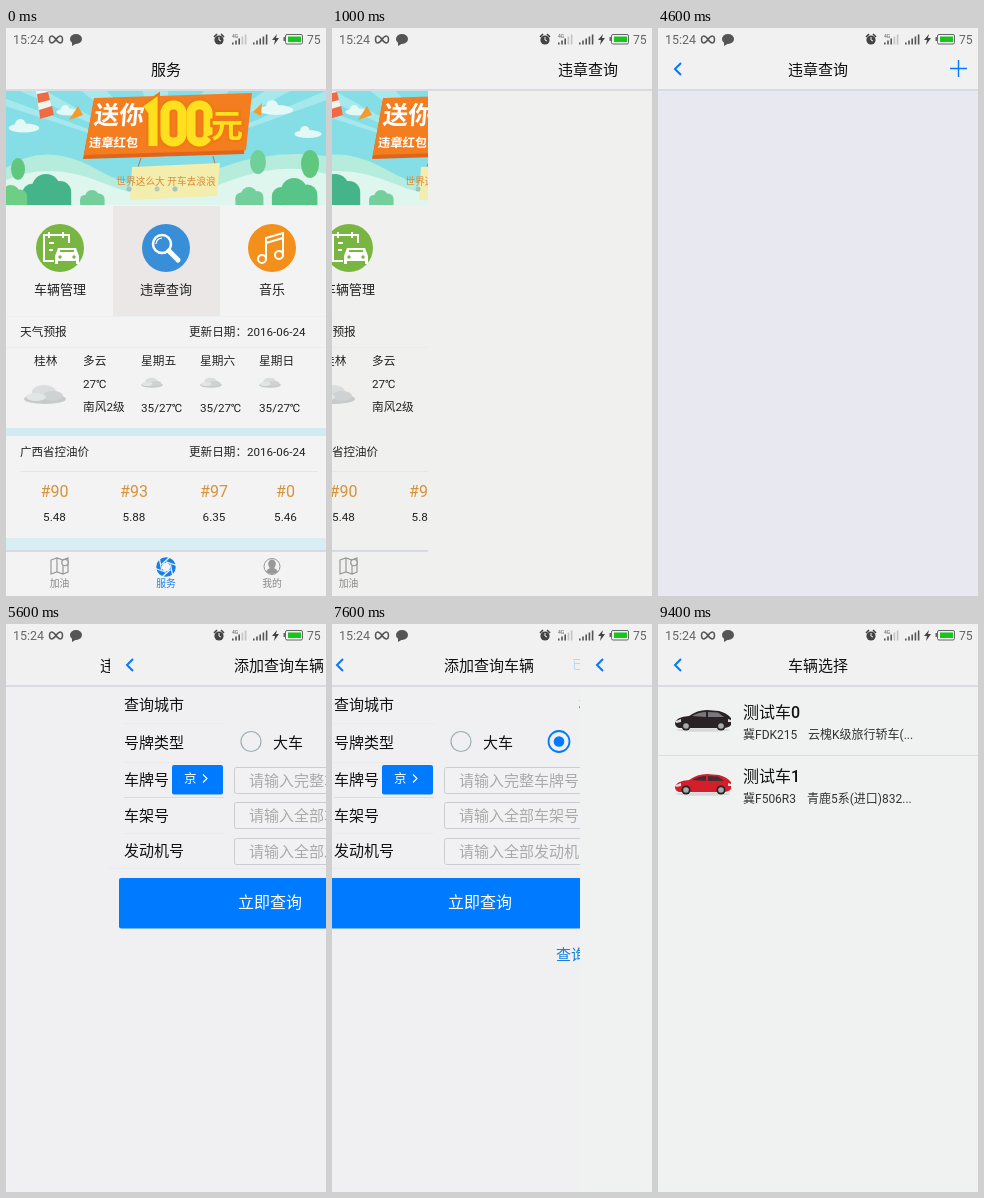
An HTML page that plays this animation: 320 by 568 pixels, repeating every 10 s.

```html
<!DOCTYPE html>
<html lang="zh-CN">
<head>
<meta charset="utf-8">
<style>
html, body { margin: 0; width: 100%; height: 100%; overflow: hidden; background: #f2f2f2; }
svg { display: block; width: 320px; height: 568px; }
text { font-family: Roboto, "Noto Sans CJK SC", "Noto Sans CJK", sans-serif; white-space: pre; }
</style>
</head>
<body>
<svg id="stage" viewBox="0 0 320 568"></svg>
<script>
const BLUE = '#007aff';
const stage = document.getElementById('stage');

// Markup helpers; text is placed by its vertical centre
const text = (x, y, s, size = 11.7, fill = '#222', extra = '') =>
  `<text x="${x}" y="${y + size * .37}" font-size="${size}" fill="${fill}" ${extra}>${s}</text>`;
const mid = (x, y, s, size, fill, extra = '') => text(x, y, s, size, fill, 'text-anchor="middle" ' + extra);
const rect = (x, y, w, h, fill, extra = '') =>
  `<rect x="${x}" y="${y}" width="${w}" height="${h}" fill="${fill}" ${extra}/>`;
const circle = (x, y, r, fill, extra = '') => `<circle cx="${x}" cy="${y}" r="${r}" fill="${fill}" ${extra}/>`;
const oval = (x, y, rx, ry, fill) => `<ellipse cx="${x}" cy="${y}" rx="${rx}" ry="${ry}" fill="${fill}"/>`;
const shape = (d, fill) => `<path d="${d}" fill="${fill}"/>`;
const line = (d, stroke, w = 1, extra = '') =>
  `<path d="${d}" fill="none" stroke="${stroke}" stroke-width="${w}" ${extra}/>`;
const group = (x, y, s, extra = '') => `<g transform="translate(${x} ${y})" ${extra}>${s}</g>`;

const header = (title, x) => rect(0, 22, 320, 39, '#f1f1f1') + rect(0, 61, 320, 2, '#d8dbe1') +
  mid(x, 41, title, 15, '#111');
const back = line('M23 35l-6 6l6 6', BLUE, 2);
const page = (id, bg, title, body, titleX = 160) =>
  `<g id="${id}">${rect(0, 0, 320, 568, bg, 'class="bg"')}${body}${header(title, titleX)}`;

function statusBar() {
  const bars = x => [0, 1, 2, 3, 4].map(i =>
    rect(x + i * 3.2, 14.5 - i * 2, 1.6, 2 + i * 2, i > 2 && x < 240 ? '#c4c4c4' : '#555')).join('');
  return rect(0, 0, 320, 22, '#f1f1f1') + text(7, 11.5, '15:24', 12.5, '#666') +
    line('M50 11.500C46 6 43.500 8 43.500 11.500S46 17 50 11.500S56.500 8 56.500 11.500S54 17 50 11.500', '#555', 1.5) +
    oval(70, 11, 6, 5, '#555') + shape('M66 13v5l5-3z', '#555') +
    circle(213, 12, 4.6, '#444') + line('M213 9v3l2 1', '#f2f2f2') + line('M208 9l3-3M218 9l-3-3', '#444', 1.6) +
    text(226, 8, '4G', 5, '#555') + bars(226) + bars(247) +
    shape('M271 6l-5 6h3l-1 5l5-7h-3z', '#444') +
    rect(279.500, 6.500, 17, 9.500, 'none', 'rx="1.500" stroke="#666"') + rect(277.500, 9, 2, 4, '#666') +
    rect(282, 8.500, 13, 5.500, '#18c51c') + text(301, 11.5, '75', 12.2, '#666');
}

function banner() {
  const rays = [0, 1, 2, 3, 4, 5, 6].map(i =>
    shape(`M160 130L${-50 + i * 62} 62h26z`, '#a5e9ec')).join('');
  const cloud = (x, y, k) => oval(x, y, 17 * k, 5 * k, '#e4f8f6') + circle(x - 4 * k, y - 4 * k, 6 * k, '#e4f8f6');
  const bush = (x, y, r, fill) => circle(x, y, r, fill) + circle(x + r, y + r * .3, r * .8, fill) +
    circle(x - r, y + r * .4, r * .7, fill) + rect(x - r * 1.7, y + r * .4, r * 3.5, 177 - y - r * .4, fill);
  const zero = x => `<rect x="${x}" y="77" width="17" height="37" rx="8"/>`;
  const hundred = (stroke, w) =>
    `<g fill="none" stroke="${stroke}" stroke-width="${w}"><path d="M140 82l7-5v41"/>${zero(159)}${zero(185)}</g>`;
  const yuan = mid(221, 97, '元', 32, '#ffe01f',
    'font-weight="900" stroke="#f07a14" stroke-width="5" paint-order="stroke"');
  return rect(0, 62, 320, 115, '#85dde6') + rays + cloud(18, 100, .9) + cloud(62, 84, .7) +
    cloud(270, 82, 1) + cloud(302, 106, .8) +
    shape('M30 62h11l7 25l-14 4z', '#f4f4ee') + shape('M31 66l11-2l2 8l-12 3zM33 82l13-4l2 9l-14 4z', '#ee6b46') +
    shape('M0 140Q40 112 92 142T200 146T320 128V177H0z', '#b5ecdc') +
    shape('M0 152Q45 132 100 156T215 156T320 146V177H0z', '#dff6ee') +
    oval(12, 141, 7, 11, '#5fc77e') + oval(222, 88, 7, 9, '#5fc77e') +
    oval(252, 134, 8, 12, '#6fd09a') + oval(304, 136, 9, 14, '#5fc77e') +
    bush(40, 160, 14, '#45b48b') + bush(5, 166, 9, '#6fce85') + bush(86, 169, 7, '#74cf9c') +
    bush(243, 167, 8, '#74cf9c') + bush(288, 163, 13, '#58c487') +
    shape('M63 92l9-14l5 9z', '#f59b2c') + shape('M247 84l9-9l-1 13z', '#f59b2c') +
    shape('M88 72L244 67L238 126L77 131z', '#e0651a') + shape('M88 70L246 65L240 122L78 127z', '#f47d20') +
    '<g transform="skewX(-5) translate(9 0)">' + text(87, 87, '送你', 25, '#fff', 'font-weight="900"') +
    text(84, 114, '违章红包', 12.3, '#fff', 'font-weight="700"') + '</g>' +
    hundred('#f07a14', 14) + hundred('#ffe01f', 9) + yuan +
    line('M135 130l-4 12M207 128l3 12', '#b27b3f') +
    shape('M126 139L214 135L211 168L124 172z', '#f3edae') +
    mid(160, 153, '世界这么大 开车去浪浪', 9.7, '#d98a35', 'font-weight="500"') +
    circle(123, 161, 2.5, '#9fc5c1') + circle(151, 161, 2.5, '#b9c9b5') + circle(169, 161, 2.5, '#9fc5c1');
}

function cloudIcon(x, y, k) {
  return group(x, y, `<g transform="scale(${k})">` + oval(0, 4, 21, 5, '#c6caca') + oval(-1, -3, 12, 7, '#d9dddd') +
    oval(8, 1, 10, 5, '#ced2d2') + oval(-9, 2, 10, 4, '#e2e5e5') + '</g>');
}

function home() {
  const menu = [['#78b641', '车辆管理'], ['#398ed8', '违章查询'], ['#f3901c', '音乐']].map(([c, s], i) =>
    circle(54 + i * 106, 220, 24, c) + mid(54 + i * 106, 261, s, 13)).join('');
  const icons = line('M48 233H38V207h25v8M43 204v6M57 204v6M43 215h5M43 222h4', '#fff', 2) +
    shape('M49 228l3-8h18l3 8v8h-3v-3h-18v3h-3z', '#fff') +
    circle(54, 229, 1.7, '#78b641') + circle(68, 229, 1.7, '#78b641') + line('M54 223h14', '#78b641', 2) +
    circle(156, 216, 9, 'none', 'stroke="#fff" stroke-width="2.500"') +
    line('M163 223l9 9', '#fff', 5, 'stroke-linecap="round"') + line('M150 216a6 6 0 0 1 6-6', '#fff', 1.2) +
    line('M260 231V210l17-5v21M260 215l17-5', '#fff', 2) +
    circle(256, 231, 4, 'none', 'stroke="#fff" stroke-width="2"') +
    circle(273, 227, 4, 'none', 'stroke="#fff" stroke-width="2"');
  const days = ['五', '六', '日'].map((d, i) => {
    const x = 135 + i * 59;
    return text(x, 333, '星期' + d) + cloudIcon(x + 11, 355, .52) + text(x, 380, '35/27℃');
  }).join('');
  const prices = [['#90', '5.48'], ['#93', '5.88'], ['#97', '6.35'], ['#0', '5.46']].map(([n, p], i) => {
    const x = [48.5, 128, 208, 279.5][i];
    return mid(x, 463, n, 16, '#d6923b') + mid(x, 489, p);
  }).join('');
  const blades = [0, 60, 120, 180, 240, 300].map(a =>
    `<path d="M-4.500 -2.500L4 -10" stroke="#f2f2f2" stroke-width="1.200" transform="rotate(${a})"/>`).join('');
  const tabs = rect(0, 522, 320, 2, '#d5d9e8') +
    line('M45 532l6-2l6 2l5-2v14l-5 2l-6-2l-6 2zM51 530v14M57 538v8', '#999', 1.2) +
    circle(59, 534.5, 3.2, '#f2f2f2', 'stroke="#999" stroke-width="1.300"') +
    group(160, 539, circle(0, 0, 7, 'none', 'stroke="#167fe6" stroke-width="5.500"') + blades) +
    circle(266, 538.5, 8, 'none', 'stroke="#999"') + oval(266, 536, 3.8, 4.5, '#999') +
    shape('M260 544q1-3 4-4h4q3 1 4 4q-6 4-12 0z', '#999') +
    mid(53.5, 555, '加油', 9.8, '#888') + mid(160, 555, '服务', 9.8, '#167fe6') + mid(266, 555, '我的', 9.8, '#888');
  return page('home', '#f3f3f3', '服务',
    banner() + rect(107, 178, 107, 110, '#ebe7e7', 'id="pressed"') + menu + icons +
    rect(0, 288, 320, 1, '#eeeff0') + text(14, 304, '天气预报') + text(183, 304, '更新日期：2016-06-24', 11.6) +
    rect(0, 319, 320, 1, '#e9ebec') + text(28, 333, '桂林') + cloudIcon(39, 367, 1) +
    text(77, 333, '多云') + text(77, 356, '27℃') + text(77, 379, '南风2级') + days +
    `<g id="bands">${rect(0, 400, 320, 8, '#d1ebf1')}${rect(0, 510, 320, 12, '#d9eef3')}</g>` +
    text(14, 424, '广西省控油价', 11.5) + text(183, 424, '更新日期：2016-06-24', 11.6) +
    rect(14, 443, 298, 1, '#e4e6e8') + prices + tabs) + '</g>';
}

function query() {
  return page('query', '#f0f0ee', '违章查询', '') +
    `<g id="queryNav">${back}${line('M292 40.500h17M300.500 32v17', BLUE, 1.4, 'id="plus"')}</g></g>`;
}

function form() {
  const field = (y, s) => rect(124.5, y - 12.5, 191, 26, '#f1f1f3', 'rx="2" stroke="#c9cdd1"') +
    text(139, y, s, 15, '#aaa');
  const labels = [[80, '查询城市'], [118, '号牌类型'], [155, '车牌号'], [191, '车架号'], [226, '发动机号']]
    .map(([y, s]) => text(14, y, s, 15, '#111')).join('');
  return page('form', '#f0f0f2', '添加查询车辆',
    [99, 138, 209].map(y => rect(14, y, 100, 1, '#eaeaec')).join('') + rect(14, 173, 100, 1, '#dadcde') +
    rect(0, 244, 320, 1, '#e8eaec') + labels +
    text(259, 80, '桂林', 15, '#111') + line('M297 77l4 4.500l-4 4.500', '#bbb', 1.2) +
    circle(141, 117.5, 10, 'none', 'stroke="#9cadb5" stroke-width="1.200"') + text(163, 118, '大车', 15, '#111') +
    circle(239, 117.5, 10.5, 'none', `stroke="${BLUE}" stroke-width="1.800"`) + circle(239, 117.5, 5.3, BLUE) +
    text(261, 118, '小车', 15, '#111') +
    rect(62, 141, 51, 29.5, BLUE, 'rx="2"') + text(74, 154, '京', 12.5, '#fff') +
    line('M93 150.500l4 4l-4 4', '#fff', 1.1) +
    field(156, '请输入完整车牌号') + field(191, '请输入全部车架号') + field(227, '请输入全部发动机号') +
    rect(9, 254, 302, 50.5, BLUE, 'rx="2"') +
    mid(160, 278.5, '立即查询', 16, '#fff') + text(236, 330, '查询有误?', 15, '#167fdc'), 169) +
    back + text(252, 40.5, '已有车辆', 12.5, BLUE, 'id="owned"') + '</g>';
}

function car(x, y, body, glass) {
  const wheel = x => circle(x, 6, 4.6, '#252525') + circle(x, 6, 2.8, '#aaa');
  return group(x, y, oval(0, 10, 27, 1.8, '#d7d9d8') +
    shape('M-28 3Q-27-3-14-4Q-6-10 4-10L16-9Q24-7 28-2V5Q26 8 20 8H-24Q-28 7-28 3z', body) +
    shape('M-11-4Q-4-8 3-8V-3zM5-8L15-7.500L21-3L5-3z', glass) +
    shape('M-27 1l5-2v3l-5 1zM25-1l3 1v2h-3z', '#ddd') + wheel(-17) + wheel(18));
}

function list() {
  const row = (y, name, plate, model, x) => text(85, y, name, 16, '#111', 'font-weight="500"') +
    text(85, y + 23, plate, 12, '#333') + text(x, y + 23, model, 12, '#333');
  return page('list', '#f0f2f1', '车辆选择', '<g id="rows">' +
    car(45, 96, '#2b2225', '#77777c') + row(88, '测试车0', '冀FDK215', '云槐K级旅行轿车(...', 150) +
    rect(0, 131, 320, 1, '#dcdfe1') +
    car(45, 160, '#d31f2b', '#4a2a30') + row(152, '测试车1', '冀F506R3', '青鹿5系(进口)832...', 149) +
    '</g>') + back + '</g>';
}

const loader = `<g id="loader">${rect(121, 240, 78, 88, '#000', 'rx="5" opacity=".6"')}` +
  line('M160 270a14 14 0 1 1-14 14', '#fff', 3, 'stroke-linecap="round"') + '</g>';

stage.innerHTML = home() + query() + form() + list() + loader + statusBar();

const el = id => document.getElementById(id);
const names = ['home', 'query', 'form', 'list'];
const starts = [-1000, 835, 5444, 7559];
const slide = (t, start) => 1 - (1 - Math.min(1, Math.max(0, (t - start) / 500))) ** 3;
const fade = (id, v) => el(id).setAttribute('opacity', v);
const paint = (id, fill) => el(id).querySelector('.bg').setAttribute('fill', fill);
const within = (t, a, b) => t >= a && t < b;

function draw(now) {
  // The screen refreshes five times a second
  const t = Math.floor(now % 10000 / 200) * 200;
  names.forEach((id, i) => {
    const enter = slide(t, starts[i]);
    const leave = i < 3 ? slide(t, starts[i + 1]) : 0;
    el(id).setAttribute('transform', `translate(${Math.round(320 * (1 - enter)) - Math.round(53.3 * leave)} 0)`);
  });
  fade('pressed', Math.max(0, 1 - t / 800));
  fade('bands', t < 1000 ? 1 : 0);
  paint('home', t < 1000 ? '#f3f3f3' : '#f0f0ee');
  paint('query', t < 1400 ? '#f0f0ee' : t < 5200 ? '#e8e8f0' : '#f0f0f2');
  fade('queryNav', within(t, 1800, 5600) ? 1 : 0);
  fade('plus', within(t, 4200, 4600) ? .3 : 1);
  fade('owned', within(t, 7200, 8200) ? .25 : 1);
  fade('rows', t >= 9000 ? 1 : 0);
  fade('loader', within(t, 2400, 2600) || within(t, 8600, 9200) ? 1 : within(t, 9200, 9400) ? .5 : 0);
}

const began = performance.now();
function tick() {
  draw(performance.now() - began);
  requestAnimationFrame(tick);
}
tick();
</script>
</body>
</html>
```
